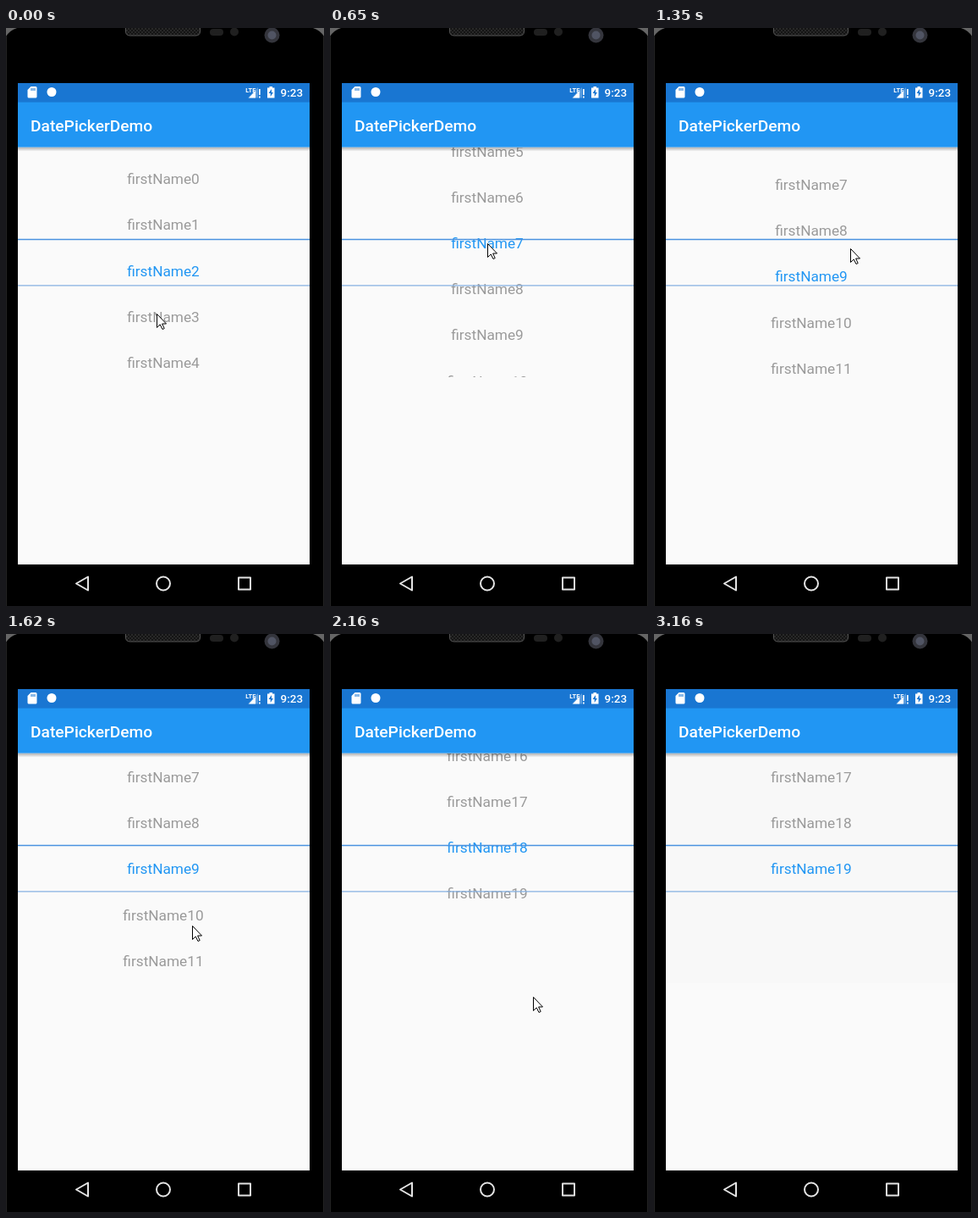
Animation, 376 px wide and 682 px high, one loop 3.82 s. Source, as an HTML page:

```html
<!DOCTYPE html>
<html lang="en">
<head>
<meta charset="utf-8">
<title>Picker demo</title>
<style>
  html, body { margin: 0; width: 100%; height: 100%; overflow: hidden; background: #000; }
  svg { display: block; width: 376px; height: 682px; }
  text { font-family: Roboto, sans-serif; }
  .bar { fill: #fff; font-weight: 500; }
  #items text { font-size: 17.25px; text-anchor: middle; fill: #9a9a9a; }
  #items .on { fill: #2196f3; }
  .nav { fill: none; stroke: #e4e4e4; stroke-width: 2; stroke-linejoin: round; }
</style>
</head>
<body>
<svg viewBox="0 0 376 682">
  <defs>
    <clipPath id="list"><rect x="14" y="141" width="345" height="271"/></clipPath>
    <linearGradient id="shade" x2="0" y2="1">
      <stop stop-color="#000" stop-opacity=".3"/>
      <stop offset="1" stop-color="#000" stop-opacity="0"/>
    </linearGradient>
    <pattern id="mesh" width="4" height="4" patternUnits="userSpaceOnUse">
      <rect width="4" height="4" fill="#141414"/>
      <path d="M0 1h2M2 3h2" stroke="#3c3c3c"/>
    </pattern>
  </defs>

  <!-- Phone body -->
  <rect width="376" height="682"/>
  <path d="M0 0H13Q4 3 0 10ZM376 0H363Q372 3 376 10Z" fill="#666"/>
  <path d="M.5 10V682M375.5 10V682" stroke="#222"/>
  <path d="M141.5-2V4Q141.5 9 147 9H224Q229.5 9 229.5 4V-2Z" fill="url(#mesh)" stroke="#555"/>
  <rect x="241" y="1" width="16" height="8" rx="4" fill="#202020"/>
  <circle cx="270" cy="4.5" r="5" fill="#202020"/>
  <circle cx="314.5" cy="8.5" r="9" fill="#34353c"/>
  <circle cx="314.5" cy="8.5" r="5" fill="#505463"/>

  <!-- App screen -->
  <rect x="14" y="65" width="345" height="568" fill="#fafafa"/>
  <rect id="tint" x="14" y="141" width="345" height="271" fill="#f8f8f8"/>
  <g clip-path="url(#list)"><g id="items"></g></g>
  <path d="M14 249.5H359" stroke="#4a92e0" stroke-width="1.3"/>
  <path d="M14 303.8H359" stroke="#86b1e2" stroke-width="1.3"/>
  <rect x="14" y="140.6" width="345" height="5" fill="url(#shade)"/>
  <rect x="14" y="65" width="345" height="23" fill="#1976d2"/>
  <rect x="14" y="87.6" width="345" height="53" fill="#2196f3"/>
  <text class="bar" x="29" y="122.3" font-size="19.2">DatePickerDemo</text>

  <!-- Status icons -->
  <g fill="#fff">
    <path d="M29.5 69H35Q36.5 69 36.5 70.5V81Q36.5 82.5 35 82.5H27Q25.5 82.5 25.5 81V73Z"/>
    <path d="M30 71v3M32 71v3M34 71v3" stroke="#1976d2"/>
    <circle cx="54" cy="75.5" r="5.5"/>
    <path d="M298 70V82.5H286Z" opacity=".3"/>
    <path d="M295 74V82.5H287Z"/>
    <text x="283.3" y="75.8" font-size="7.4" font-weight="700">LTE</text>
    <path d="M299 72h1.7v7h-1.7zM299 80.5h1.7v2h-1.7z"/>
    <path d="M311.5 69h3.5v1.5h2.5v12h-8.5v-12h2.5z"/>
    <path d="M314 72l-3.5 5h2.2v4l3.3-5h-2z" fill="#1976d2"/>
    <text class="bar" x="351" y="81" font-size="13.4" text-anchor="end">9:23</text>
  </g>

  <!-- Navigation bar -->
  <g class="nav">
    <path d="M83 655.5L97 647.5V663.5Z"/>
    <circle cx="186" cy="655.5" r="8"/>
    <rect x="275" y="648.5" width="14" height="14"/>
  </g>

  <path id="cursor" d="M.5 .5V16.5L4.2 12.9L7 18.5L9.2 17.5L6.6 12H11.5Z" fill="#fff" stroke="#000"/>
</svg>
<script>
const LOOP = 3820, ROW = 54.2, TOP = 177.9, MIDDLE = 277;
const TICK = 137.4, LEAD = 38, LAST = 23, END_REACHED = 17;

// Turning points of each gesture: tick, then position
const drag = [[0, 0], [5, 303.4], [7, 320.5], [8, 356.6], [12, 388.4], [16, 901.6], [END_REACHED, 930.4]];
const pointer = [
  [0, 178, 337], [3, 184, 130], [5, 186, 254], [8, 187, 131], [10, 232, 260],
  [12, 220, 344], [16, 240, 428], [19, 240, 428], [22, 257, 643]
];

const byId = id => document.getElementById(id);
const list = byId('items'), cursor = byId('cursor'), tint = byId('tint');

const rows = Array.from({ length: 20 }, (_, i) => {
  const row = document.createElementNS('http://www.w3.org/2000/svg', 'text');
  row.setAttribute('x', 186);
  row.setAttribute('y', TOP + 6.2 + i * ROW);
  row.textContent = 'firstName' + i;
  return list.appendChild(row);
});

const move = (el, x, y) => el.setAttribute('transform', `translate(${x} ${y})`);
const show = (el, on) => { el.style.visibility = on ? 'visible' : 'hidden'; };
const smooth = u => u * u * (3 - 2 * u);

// Eased position along a track of turning points
function along(track, tick) {
  const next = track.findIndex(key => key[0] > tick);
  if (next < 0) return track.at(-1).slice(1);
  const [from, ...a] = track[next - 1], [to, ...b] = track[next];
  const u = smooth((tick - from) / (to - from));
  return a.map((v, i) => v + (b[i] - v) * u);
}

function draw(t) {
  const tick = Math.min(LAST, Math.floor((t + LEAD) / TICK));
  const [scroll] = along(drag, tick);
  const selected = Math.round((MIDDLE - TOP + scroll) / ROW);
  move(list, 0, -scroll);
  move(cursor, ...along(pointer, tick));
  rows.forEach((row, i) => row.classList.toggle('on', i === selected));
  show(tint, tick >= END_REACHED);
  show(cursor, tick < LAST);
}

const start = performance.now();
function play() {
  draw((performance.now() - start) % LOOP);
  requestAnimationFrame(play);
}
play();
</script>
</body>
</html>
```
